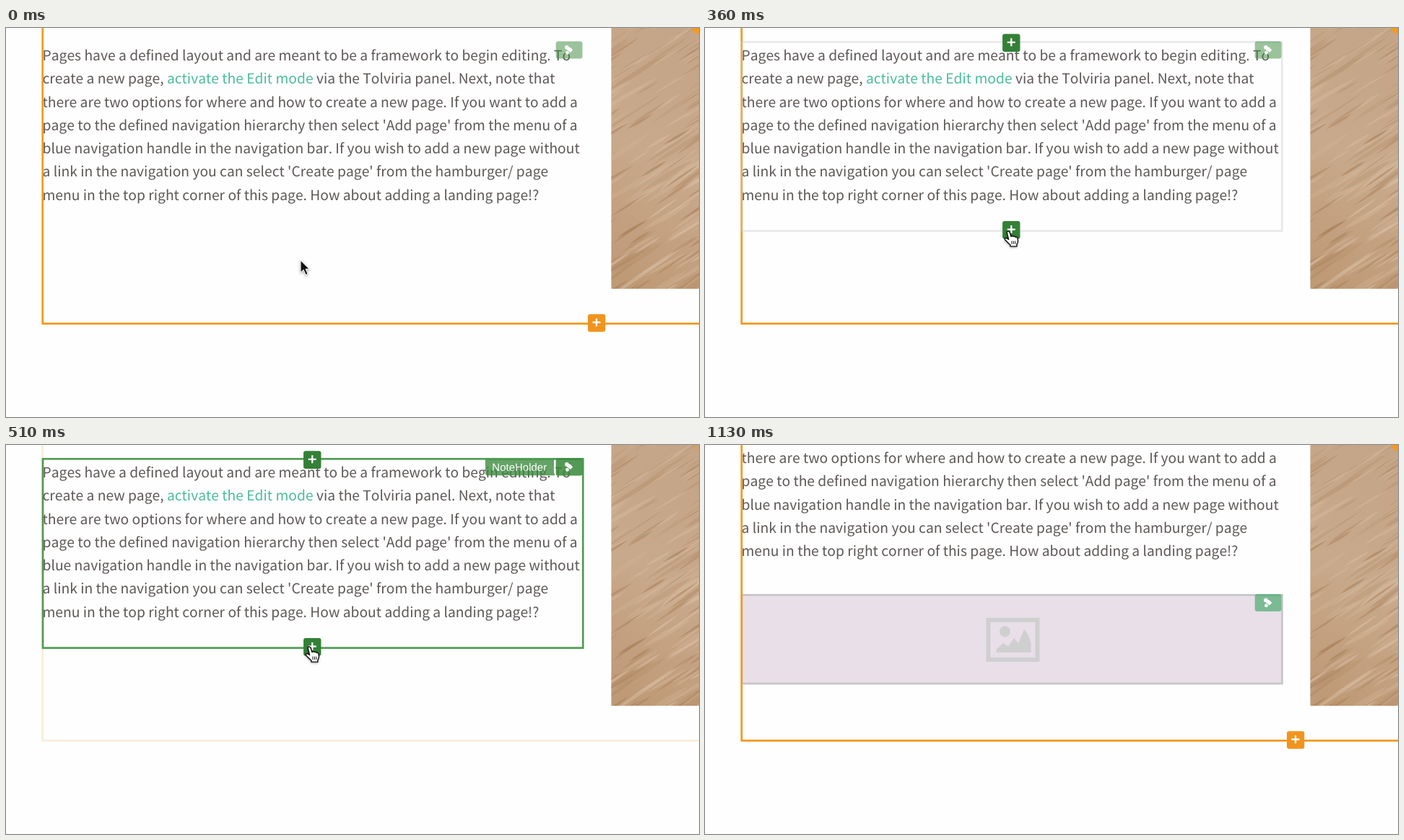
An HTML page for the animation above (2130 ms loop, 960 by 540 pixels).

```html
<!DOCTYPE html>
<html lang="en">
<head>
<meta charset="utf-8">
<title>Adding a widget</title>
<style>
html, body { margin: 0; width: 100%; height: 100%; overflow: hidden; background: #fefefe; }
svg { display: block; width: 100vw; height: 100vh; }
.copy {
  font: 19.27px "Noto Sans CJK SC", "Noto Sans CJK JP", "Noto Sans CJK TC", "Noto Sans CJK KR", "Noto Sans CJK", "Noto Sans", sans-serif;
  font-kerning: none;
  fill: #5d5856;
  text-rendering: geometricPrecision;
}
.link { fill: #4abd9a; }
.label { font: 15px "Liberation Sans", Arial, sans-serif; fill: #fff; text-rendering: geometricPrecision; }
.cursor { filter: drop-shadow(0 1.5px 1.5px rgba(0, 0, 0, .4)); }
</style>
</head>
<body>
<svg viewBox="0 0 960 540">
  <defs>
    <linearGradient id="wood" x1="0.6" y1="0" x2="0.4" y2="1">
      <stop offset="0" stop-color="#c5a587"/>
      <stop offset=".5" stop-color="#c8a98b"/>
      <stop offset="1" stop-color="#bf9a77"/>
    </linearGradient>
    <clipPath id="photoClip"><rect x="838.5" y="0" width="121.5" height="362"/></clipPath>
    <path id="plus" d="M-5.5 0H5.5M0 -5.5V5.5" stroke="#fff" stroke-width="2.3"/>
    <g id="menuIcon" fill="#fff">
      <circle cx="-2.6" cy="-3.5" r="2.8"/>
      <circle cx="-2" cy="4" r="2.4"/>
      <path d="M-1 -4.5L2.5 -3.5L5.8 0L2.5 3.5L0 1.5L-2.5 0Z"/>
    </g>
  </defs>
  <rect width="960" height="540" fill="#fefefe"/>
  <g clip-path="url(#photoClip)">
    <rect x="838" width="122" height="362" fill="url(#wood)"/>
    <g id="grain"></g>
  </g>

  <g id="placeholder">
    <rect x="51" y="208.2" width="748.5" height="123" fill="#e8dfe8" stroke="#c5c4c6" stroke-width="2.6"/>
    <g fill="#d0cfd0">
      <path fill-rule="evenodd" d="M389.5 240H463.5V301H389.5ZM395.5 246V295H457.5V246Z"/>
      <circle cx="415.5" cy="259" r="7.5"/>
      <path d="M403.5 288V284L413 275L420 279.5L428 268L434 275.5L442 256L447 262L451.5 274V288Z"/>
    </g>
  </g>

  <g id="copy" class="copy"></g>

  <g id="section" fill="#f39a1e">
    <path d="M50.7 -5V410.4H965" fill="none" stroke="#f39a1e" stroke-width="2.7"/>
    <path d="M950 0Q953 7 960 9V0Z"/>
  </g>
  <g id="sectionPlus" transform="translate(818 409.3)">
    <rect x="-12" y="-12" width="24.3" height="24.5" rx="3" fill="#f0941f"/>
    <use href="#plus" y="-.6"/>
  </g>

  <rect id="hoverBox" x="51" y="19.3" width="748.3" height="262.4" fill="none" stroke="#c5c5ca" stroke-width="2.6"/>
  <rect id="activeBox" x="51" y="19.3" width="748.3" height="262.4" fill="none" stroke="#2f8b33" stroke-width="2.7"/>

  <g id="tagLabel">
    <path d="M664 20H760V42.3H667Q664 42.3 664 39.3Z" fill="#38893a"/>
    <rect x="759" y="21" width="2.4" height="18.5" fill="#fff"/>
    <text class="label" x="673.3" y="36">NoteHolder</text>
  </g>
  <g id="tag">
    <rect id="tagFill" x="761.7" y="18.5" width="36.8" height="24" rx="3" fill="#38893a"/>
    <use href="#menuIcon" x="779.5" y="30.4"/>
  </g>

  <g id="insert">
    <g transform="translate(424.3 20.5)">
      <rect x="-12.2" y="-12.2" width="24.4" height="24.6" rx="3" fill="#338136"/>
      <use href="#plus" y="-.7"/>
    </g>
    <g transform="translate(424.3 280.3)">
      <rect x="-12.2" y="-12.2" width="24.4" height="24.6" rx="3" fill="#338136"/>
      <use href="#plus" y="-.7"/>
    </g>
  </g>

  <g id="cursor" class="cursor">
    <path id="arrow" d="M0 0V17.6L4.1 13.9L7.1 20.8L10.2 19.4L7.3 12.9H12.6Z" fill="#111" stroke="#fff" stroke-width="1.1"/>
    <g id="hand" stroke="#111" stroke-width="1.4" stroke-linejoin="round" stroke-linecap="round">
      <path d="M-1.8 2.2Q-1.4 .3 .4 .6Q1.8 1 2.4 3L4 8Q5.6 6.6 7.2 8Q9 7 10.3 8.9Q12.4 8.3 13 10.6L13.5 14Q13.4 16.8 11.9 18.6V21.6H3V19.8Q-.6 16.6 -4.3 12.6Q-5.4 10.6 -3.6 10Q-2 9.8 .6 12Z" fill="#fff"/>
      <path d="M5 14.5V18M7.4 14.5V18M9.8 14.5V18" stroke-width="1"/>
    </g>
  </g>
</svg>
<script>
const LOOP = 2130, STEP = 30, HOVER = 330, FADE = 375, FADE_TIME = 255, INSERTED = 1130;
const SCROLL = -84.5;
const $ = id => document.getElementById(id);

function add(parent, name, attrs, text) {
  const el = document.createElementNS("http://www.w3.org/2000/svg", name);
  for (const key in attrs) el.setAttribute(key, attrs[key]);
  if (text) el.textContent = text;
  parent.append(el);
  return el;
}

const lines = [
  "Pages have a defined layout and are meant to be a framework to begin editing. To",
  "create a new page, |activate the Edit mode| via the Tolviria panel. Next, note that",
  "there are two options for where and how to create a new page. If you want to add a",
  "page to the defined navigation hierarchy then select 'Add page' from the menu of a",
  "blue navigation handle in the navigation bar. If you wish to add a new page without",
  "a link in the navigation you can select 'Create page' from the hamburger/ page",
  "menu in the top right corner of this page. How about adding a landing page!?"
];
lines.forEach((line, i) => {
  const row = add($("copy"), "text", { x: 50.5, y: 45.2 + 32.25 * i, "xml:space": "preserve" });
  line.split("|").forEach((part, k) => add(row, "tspan", k === 1 ? { class: "link" } : {}, part));
});

let seed = 17;
const random = (min, max) => {
  seed = seed * 16807 % 2147483647;
  return min + (max - min) * seed / 2147483647;
};

// Tapered diagonal wood grain, stronger towards the bottom.
const tones = ["#dfc7ad", "#a0764f", "#d6baa0", "#ac845e"];
function grain(count, length, width, opacity) {
  for (let i = 0; i < count; i++) {
    const x = random(800, 950), y = random(0, 420);
    const dx = length * random(.5, 1), dy = -dx * random(.58, .72), w = width * random(.4, 1);
    add($("grain"), "path", {
      d: `M${x} ${y}q${dx * .4} ${dy * .4 - w} ${dx} ${dy}q${-dx * .4} ${w - dy * .4} ${-dx} ${-dy}z`,
      fill: tones[i % 4],
      opacity: opacity * random(.6, 1) * (.55 + y / 700)
    });
  }
}
grain(36, 130, 13, .4);
grain(110, 60, 5, .6);

// The standard CSS "ease" curve.
function ease(p) {
  if (p <= 0) return 0;
  if (p >= 1) return 1;
  const bez = (a, b, u) => 3 * a * u * (1 - u) ** 2 + 3 * b * u * u * (1 - u) + u ** 3;
  let lo = 0, hi = 1;
  for (let i = 0; i < 20; i++) {
    const mid = (lo + hi) / 2;
    if (bez(.25, .25, mid) < p) lo = mid; else hi = mid;
  }
  return bez(.1, 1, lo);
}

const path = [[0, 408, 322], [120, 410.5, 310], [360, 420, 281.5], [450, 420, 279.5]];
function cursorAt(t) {
  const i = path.findIndex(p => p[0] > t);
  if (i < 0) return path[path.length - 1].slice(1);
  const a = path[i - 1], b = path[i], p = (t - a[0]) / (b[0] - a[0]);
  return [a[1] + (b[1] - a[1]) * p, a[2] + (b[2] - a[2]) * p];
}

const show = (id, on) => $(id).setAttribute("visibility", on ? "visible" : "hidden");
const fade = (id, value) => $(id).setAttribute("opacity", value);
const move = (id, x, y) => $(id).setAttribute("transform", `translate(${x} ${y})`);

function draw(time) {
  const t = Math.floor(time / STEP + 1e-6) * STEP;
  const inserted = time >= INSERTED;
  const hover = !inserted && t >= HOVER;
  const active = inserted ? 0 : ease((t - FADE) / FADE_TIME);

  show("placeholder", inserted);
  show("sectionPlus", !hover);
  show("insert", hover);
  show("cursor", !inserted);
  show("arrow", !inserted && !hover);
  show("hand", hover);

  move("copy", 0, inserted ? SCROLL : 0);
  move("tag", 0, inserted ? 188.5 : 0);
  move("cursor", ...cursorAt(t));

  fade("section", 1 - active);
  fade("hoverBox", hover ? Math.min(.4, (t - HOVER + STEP) / 150) * (1 - active) : 0);
  fade("activeBox", active);
  fade("tagLabel", .93 * active);
  fade("tagFill", inserted ? .65 : .5 + .43 * active);
  $("tagFill").setAttribute("fill", inserted ? "#43a767" : "#38893a");
}

const start = performance.now();
function tick() {
  draw((performance.now() - start) % LOOP);
  requestAnimationFrame(tick);
}
tick();
</script>
</body>
</html>
```
